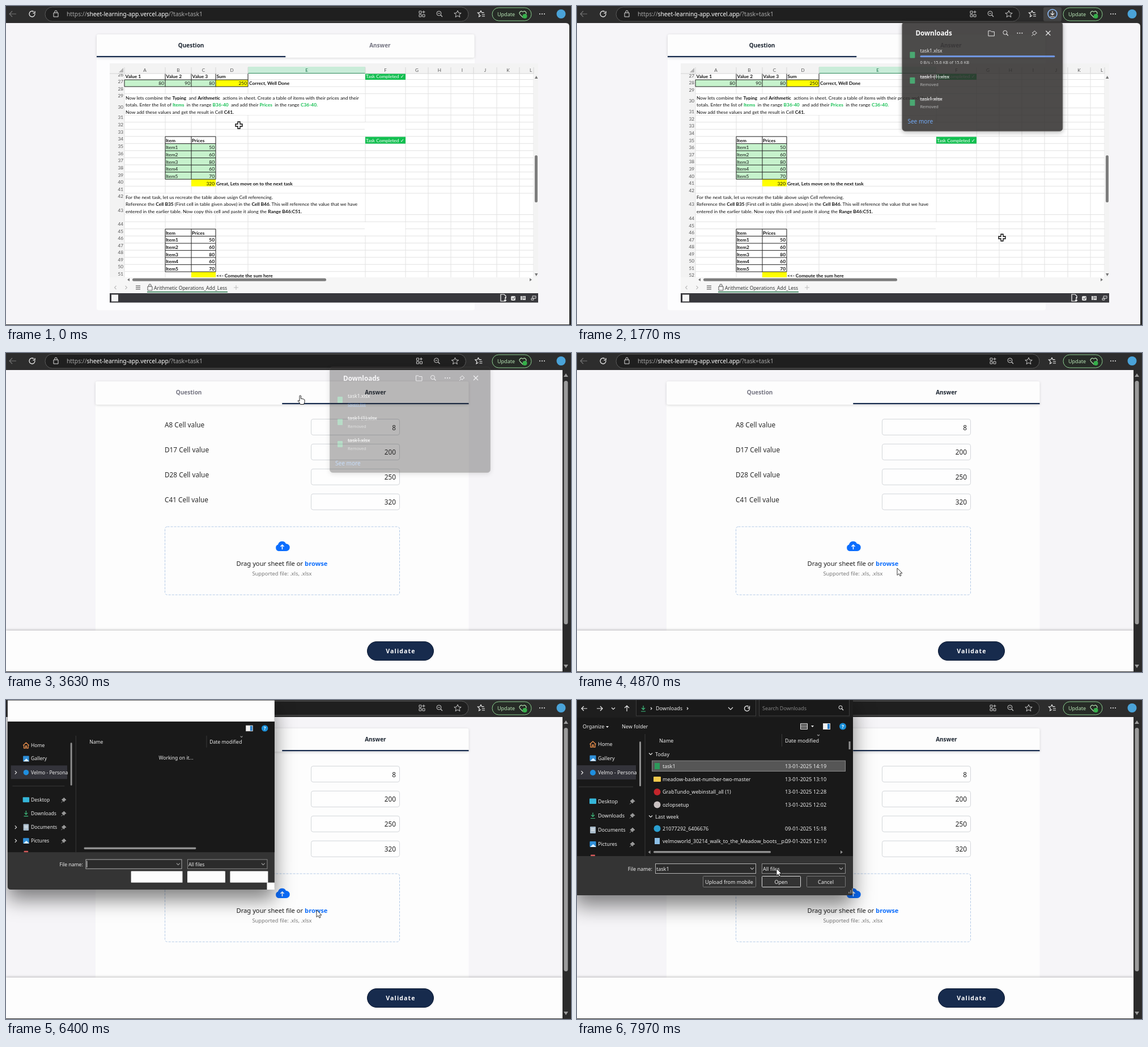
An HTML page that plays this animation: 997 px wide and 562 px high, repeating every 8 s.

```html
<!DOCTYPE html>
<html lang="en">
<head>
<meta charset="utf-8">
<title>Spreadsheet task walkthrough</title>
<style>
  html, body { margin: 0; width: 100%; height: 100%; overflow: hidden; background: #f6f5f8; }
  svg { display: block; width: 100vw; height: 100vh; font-family: "Noto Sans", "Open Sans", sans-serif; }
  .sheet { font-family: Lato, sans-serif; }
  #dialog { filter: drop-shadow(0 18px 18px rgba(0, 0, 0, .5)); }
  #popup { filter: drop-shadow(0 2px 4px rgba(0, 0, 0, .35)); }
</style>
</head>
<body>
<svg id="stage" viewBox="0 0 997 562"></svg>
<script>
const BOLD = 'font-weight="700"', SEMI = 'font-weight="600"';
const MID = 'text-anchor="middle"', END = 'text-anchor="end"';
const NAVY = '#172b4d', GREEN = '#12bf50', BLUE = '#0d6efd';

const rect = (x, y, w, h, fill, extra = '') =>
  `<rect x="${x}" y="${y}" width="${w}" height="${h}" fill="${fill}" ${extra}/>`;
const path = (d, stroke, width = 1, fill = 'none', extra = '') =>
  `<path d="${d}" stroke="${stroke}" stroke-width="${width}" fill="${fill}" ${extra}/>`;
const dot = (x, y, r, fill, extra = '') => `<circle cx="${x}" cy="${y}" r="${r}" fill="${fill}" ${extra}/>`;
// y is the vertical middle of the line
const text = (x, y, s, size, fill, extra = '') =>
  `<text x="${x}" y="${y + size * .36}" font-size="${size}" fill="${fill}" ${extra}>${s}</text>`;
const group = (id, content, extra = '') => `<g id="${id}" ${extra}>${content}</g>`;
const span = (s, extra) => `<tspan ${extra}>${s}</tspan>`;
const dots = (x, y, c) => [-4, 0, 4].map(d => dot(x + d, y, 1, c)).join('');
const lens = (x, y, c, r = 4) => dot(x - 1, y - 1, r, 'none', `stroke="${c}"`) + path(`M${x + r - 2} ${y + r - 2}l3 3`, c, 1.2);
const chevron = (x, y, c, d = 'down', s = 3) => path(
  d === 'down' ? `M${x - s} ${y - s / 2}l${s} ${s}l${s} ${-s}` :
  d === 'right' ? `M${x - s / 2} ${y - s}l${s} ${s}l${-s} ${s}` : `M${x + s / 2} ${y - s}l${-s} ${s}l${s} ${s}`, c, 1.1);
const downArrow = (x, y, c, s = 4) =>
  path(`M${x} ${y - s - 1}v${2 * s - 1}m${-s + 1} ${-s + 1}l${s - 1} ${s - 1}l${s - 1} ${-s + 1}M${x - s} ${y + s + 1}h${2 * s}`, c, 1.2);
const lock = (x, y, c) => path(`M${x - 4} ${y - 2}h8v7h-8zM${x - 2} ${y - 2}v-2a2 2 0 0 1 4 0v2`, c);
const pin = (x, y, c, fill = 'none') => path(`M${x} ${y - 4}l4 4l-2 .5l-2 3l-4 -4l3 -2zM${x - 2} ${y + 2}l-3 3`, c, 1, fill);
const reload = (x, y, c, r = 5) =>
  path(`M${x + r} ${y}a${r} ${r} 0 1 1 -${r * .4} -${r * .8}M${x + r} ${y - r}v3.5h-3.5`, c, 1.3);

function toolbar() {
  const c = '#c9c9c9';
  return rect(0, 0, 997, 30, '#2d2d2d') +
    path('M18 14H6M11 9l-5 5l5 5', '#777', 1.1) + reload(46, 14, '#eee') +
    rect(69, 2, 747, 25, '#1f1f1f', 'id="pill" rx="12.5" stroke="#5a5a5a"') + lock(88, 14, '#ddd') +
    text(107, 14, 'https://' + span('sheet-learning-app.vercel.app', 'fill="#fff"') + '/?task=task1', 10.3, '#aaa') +
    group('tools',
      path('M729 9h4v4h-4zM729 15h4v4h-4zM735 15h4v4h-4zM737 8v5M734.5 10.5h5', c) +
      lens(765, 14, c) + path('M762 13h4', c) +
      path('M797 8l1.8 4.2l4.4 .3l-3.4 2.8l1.1 4.3l-3.9 -2.4l-3.9 2.4l1.1 -4.3l-3.4 -2.8l4.4 -.3z', c) +
      path('M838 8l1.6 3.6h4M838 8l-1.6 3.6l-4 .4l3 2.8l-.9 4l3.6 -2M840 15h5M840 18h5', '#eee', 1.1)) +
    group('download', rect(823, 2, 32, 25, '#444', 'rx="3"') + downArrow(839, 14, '#eee') +
      dot(839, 14, 8, 'none', 'id="ring" stroke="#8fc0ff" stroke-width="1.5"')) +
    rect(858, 3, 69, 23, '#262b26', 'rx="11.5" stroke="#8ccf90"') + text(867, 14.5, 'Update', 9, '#b9e6b6') +
    path('M912 20l-5 -5a3.3 3.3 0 0 1 5 -4.5a3.3 3.3 0 0 1 5 4.5z', '#b9e6b6', 1.1) + dot(915.5, 18, 4, '#35b04a') +
    dots(946, 14, '#eee') + dot(979.5, 14, 8, '#4aa3d8');
}

function tabs(x, w, active) {
  const half = w / 2;
  return rect(x, 50, w, 41, '#fdfdfd', 'rx="3" style="filter:drop-shadow(0 1px 2px rgba(0,0,0,.15))"') +
    rect(x + active * half, 88, half, 2.3, NAVY) +
    ['Question', 'Answer'].map((s, i) =>
      text(x + half * (i + .5), 69.5, s, 10, i === active ? '#1b2430' : '#737380', `${SEMI} ${MID}`)).join('');
}

const ROW = 12.53, COLS = [209, 281, 327, 370, 427, 634, 705, 745, 785, 825, 866, 906, 931];
const cell = (x, y, s, extra = '', fill = '#111') => text(x, y, s, 8.4, fill, extra);

function priceTable(y, fill, weight) {
  const prices = [50, 60, 80, 60, 70];
  let out = rect(281, y + ROW, 89, ROW * 5, fill) + rect(327, y + ROW * 6, 43, ROW, '#ff0') +
    cell(282, y + 7, 'Item', BOLD) + cell(328, y + 7, 'Prices', BOLD);
  prices.forEach((p, i) => {
    const mid = y + ROW * (i + 1.55);
    out += cell(282, mid, 'Item' + (i + 1), weight) + cell(368, mid, p, `${END} ${weight}`);
  });
  const lines = [...Array(7).keys()].map(i => `M281 ${y + ROW * i}h89`).join('');
  return out + path(`${lines}M281 ${y}v${ROW * 6}M327 ${y}v${ROW * 6}M370 ${y}v${ROW * 6}`, '#222');
}

const done = y => rect(634, y, 71, 12, GREEN) + cell(635, y + 6.2, 'Task Completed ✓', '', '#fff');

function rowLabels(first, [top, wide, upper, tall, lower]) {
  let out = '';
  for (let r = first; r < first + 26; r++) {
    const y = r < 30 ? top + 12.5 * (r - first) : r === 30 ? wide : r < 43 ? upper + 12.64 * (r - 31)
      : r === 43 ? tall : lower + 12.56 * (r - 44);
    out += text(207, y, r, 8.2, '#555', END);
  }
  return out;
}

function grid() {
  let lines = '';
  for (let k = -1; k < 27; k++) if (![2, 16, 17].includes(k)) lines += `M209 ${142 + ROW * k}H931`;
  COLS.forEach(x => lines += `M${x} 119V478`);
  const green = s => span(s, `fill="${GREEN}" ${BOLD}`), bold = s => span(s, BOLD);
  return rect(183, 101, 756, 405, '#f3f3f3') + rect(209, 119, 722, 359, '#fff') + path(lines, '#e2e2e2') +
    rect(210, 155, 423.5, 37, '#fff') + rect(210, 330.5, 423.5, 37, '#fff') +
    rect(633, 205, 71.5, 24, '#fff') + rect(633, 381, 71.5, 23, '#fff') +
    rect(209, 130, 161, 12, '#c6f2cc') + rect(370, 130, 57, 12, '#ff0') +
    path('M209 130H427V142H209zM281 119V142M327 119V142M370 119V142M427 119V130', '#222') +
    ['Value 1', 'Value 2', 'Value 3', 'Sum'].map((s, i) => cell(COLS[i] + 1.5, 124, s, BOLD)).join('') +
    [80, 90, 80, 250].map((n, i) => cell(COLS[i + 1] - 2, 136, n, END)).join('') +
    cell(429, 136, 'Correct, Well Done', BOLD) + done(118) + done(230.5) +
    cell(211, 161.5, `Now lets combine the ${bold('Typing')} \u00a0and ${bold('Arithmetic')} \u00a0actions in sheet. Create a table of items with their prices and their`) +
    cell(211, 174, `totals. Enter the list of ${green('Items')} \u00a0in the range ${green('B36-40')} \u00a0and add their ${green('Prices')} \u00a0in the range ${green('C36-40.')}`) +
    cell(211, 186.5, `Now add these values and get the result in Cell ${bold('C41.')}`) +
    priceTable(230, '#c6f2cc', '') + cell(368, 312.5, 320, END) +
    cell(371, 312.5, 'Great, Lets move on to the next task', BOLD) +
    cell(211, 336.5, 'For the next task, let us recreate the table above usign Cell referencing.') +
    cell(211, 349, `Reference the ${bold('Cell B35')} (First cell in table given above) in the ${bold('Cell B46')}. This will reference the value that we have`) +
    cell(211, 361.5, `entered in the earlier table. Now copy this cell and paste it along the ${bold('Range B46:C51.')}`) +
    priceTable(393, '#fff', BOLD) + cell(371, 475, '&lt;&lt;- Compute the sum here', BOLD) +
    group('rowsBefore', rowLabels(26, [121, 178, 196.5, 360, 384])) +
    group('rowsAfter', rowLabels(27, [123, 167, 186, 349, 374]));
}

function workbook() {
  const g = '#777';
  return `<g class="sheet">${grid()}` + rect(183, 101, 756, 18, '#f3f3f3') +
    rect(427, 107, 207, 12, '#c9ecd9') + path('M427 118.5H634', '#2c8a5a') +
    path('M183 119H427M634 119H931' + COLS.map(x => `M${x} 108V119`).join(''), '#d5d5d5') +
    path('M207 109v8h-8z', 'none', 0, '#b5b5b5') +
    [...'ABCDEFGHIJK'].map((s, i) => text((COLS[i] + COLS[i + 1]) / 2, 113.5, s, 8.2, i === 4 ? '#17734a' : '#555', MID)).join('') +
    text(926, 113.5, 'L', 8.2, '#555', MID) + '</g>' +
    rect(931, 119, 8, 360, '#f3f3f3') + rect(933, 263, 5, 83, '#7d7d7d', 'rx="2.5"') +
    path('M933 128h5.500l-2.750 -5zM933 471h5.500l-2.750 5z', 'none', 0, g) +
    rect(183, 478, 756, 28, '#f6f6f6') + rect(223, 479.7, 342, 5, '#7d7d7d', 'rx="2.5"') +
    path('M218 479.500v5.500l-4 -2.750zM924 479.500v5.500l4 -2.750z', 'none', 0, g) +
    chevron(193, 496, '#bbb', 'left') + chevron(212, 496, '#bbb', 'right') +
    path('M229 493h8M229 496h8M229 499h8', '#444') + lock(254, 496, '#555') +
    text(261, 496.5, 'Arithmetic Operations_Add_Less', 8.5, '#333') + rect(249, 503, 142, 1.5, '#217346') +
    path('M402 496h8M406 492v8', '#bbb') +
    rect(183, 506, 756, 16.500, '#38383c') + rect(186, 508.5, 12, 12, '#f5f5f5') +
    path('M881 520h-8v-12h6l3 3v4M881 513v7m-2 -2l2 2l2 -2', '#fff', 1.2) +
    rect(891, 511, 8, 8, '#ddd', 'rx="2"') + path('M893 515l2 2l3 -4', '#38383c') +
    rect(908, 511, 9, 7, '#ddd') + path('M911 511v7M912 513h4M912 515h4', '#38383c', .8) +
    path('M929 511h6v4h-6zM927 515h4v3h-4z', '#ddd');
}

function questionPage() {
  return rect(0, 30, 997, 532, '#2b2b2b') + path('M0 30H988Q994 30 994 36V561H0z', 'none', 0, '#f6f5f8') +
    rect(160, 52, 667, 484, '#fdfdfe', 'rx="4"') + tabs(160, 666.5, 0) + workbook();
}

function answerPage() {
  const fields = [['A8', 8], ['D17', 200], ['D28', 250], ['C41', 320]];
  return rect(0, 30, 982, 532, '#f6f5f8') + rect(158, 60, 658.5, 430, '#fdfdfd') + tabs(158, 658.5, 1) +
    fields.map(([name, value], i) => {
      const y = 116.500 + 43.9 * i;
      return text(280, y + 10.5, name + ' Cell value', 11.8, '#2a2a2a') +
        rect(538.5, y, 156, 28, '#fefefe', 'rx="3.5" stroke="#d3d6da"') + text(688, y + 14.8, value, 11.8, '#222', END);
    }).join('') +
    rect(280.5, 306, 414, 120, 'none', 'rx="4" stroke="#b4cbe8" stroke-dasharray="4 2"') +
    path('M481 349a6 6 0 0 1 -1 -11.500a7.500 7.500 0 0 1 14 -1.500a6.500 6.500 0 0 1 .5 13z', 'none', 0, BLUE) +
    path('M487.500 346v-8m-3 3l3 -3l3 3', '#fff', 1.5) +
    text(487, 370.5, 'Drag your sheet file or ' + span('browse', `fill="${BLUE}" ${BOLD}`), 11.2, '#1c1c1c', MID) +
    text(487, 388.5, 'Supported file: .xls, .xlsx', 9.3, '#777', MID) +
    rect(0, 489, 982, 72, '#fdfdfd', 'style="filter:drop-shadow(0 -1px 2px rgba(0,0,0,.25))"') +
    rect(637.5, 508.5, 117, 33, NAVY, 'rx="16.5" stroke="#0c1a33"') +
    text(696.5, 525, 'Validate', 10.6, '#fff', `${BOLD} ${MID} letter-spacing="1.1"`) +
    rect(0, 561, 997, 1, '#2b2b2b') + rect(982, 30, 15, 532, '#2b2b2b') +
    rect(984.5, 49, 7, 429, '#9b9b9b', 'rx="3.5"') +
    path('M984 42h8l-4 -6zM984 549h8l-4 6z', 'none', 0, '#9b9b9b');
}

function downloads() {
  const c = '#e6e6e6', file = y => rect(585, y - 5, 9, 11, '#2c9a5b', 'rx="1"');
  const removed = (y, name) => file(y + 6) + text(603, y, name, 8.6, c, 'text-decoration="line-through"') +
    text(603, y + 14, 'Removed', 7.4, '#aaa');
  return rect(571.5, 27.5, 283, 186, '#2f2d2c', 'id="panel" rx="5" stroke="#4b4947"') +
    text(595, 47.5, 'Downloads', 11.7, '#fff', SEMI) +
    path('M723.500 43h4l1.500 1.500h5v7.500h-10.500z', c) + lens(754, 47, c, 3.5) + dots(779, 47, c) + pin(805, 47, c) +
    path('M825 43l8 8M833 43l-8 8', c, 1.2) + file(85) + text(603, 78.5, 'task1.xlsx', 8.6, c) +
    group('complete', text(603, 93, 'Open file', 7.5, '#5b9bf3', 'text-decoration="underline"')) +
    group('progress', rect(603, 86.5, 238, 3, '#5b8ae6', 'rx="1.5"') + text(603, 98.5, '0 B/s - 15.6 KB of 15.6 KB', 7.45, '#ccc')) +
    group('older', removed(118, 'task1 (1).xlsx') + removed(157, 'task1.xlsx') + text(581, 197, 'See more', 10.1, '#5b9bf3'));
}

function fileDialog() {
  const c = '#ececec', line = '#555';
  const item = (y, name, icon, pinned) => icon + text(37, y, name, 9, c) + (pinned ? pin(98, y, '#999', '#999') : '');
  const picture = y => rect(22.5, y - 5, 11, 10, '#2f8fd8', 'rx="1"') + path(`M23 ${y + 5}l5.500 -5l5.500 5z`, 'none', 0, '#dff0ff');
  const entry = (y, name, date, icon) => icon + text(151, y, name, 9, c) + text(367, y, date, 9.1, c);
  const button = (x, w, s, border) => rect(x + .5, 310.5, w, 19, '#333', `rx="1" stroke="${border}"`) +
    text(x + w / 2, 320.5, s, 9, c, MID);
  return path('M-6 -5H487V339Q487 344 482 344H0Q-6 344 -6 339z', 'none', 0, '#343434') +
    rect(-6, -5, 493, 280, '#191919') + rect(-6, -5, 493, 36, '#1e1e1e') +
    path('M120 60V275M3 153H99M361.500 60V82', '#3a3a3a') +
    path('M18 15H8m4 -4l-4 4l4 4M35 15H45m-4 -4l4 4l-4 4M88 20V10m-4 4l4 -4l4 4', c, 1.2) + chevron(64, 15, c) +
    rect(104.5, -2, 211, 30, '#191919', 'stroke="#3c3c3c"') + rect(321.5, -2, 159, 30, '#191919', 'stroke="#3c3c3c"') +
    downArrow(117, 15, '#3fbf7f') + chevron(131, 15, c, 'right', 2) + text(139, 15, 'Downloads', 9, c) +
    chevron(195, 15, c, 'right', 2) + chevron(271, 15, c, 'down', 4) + reload(300, 15, c, 4.5) +
    text(327, 15, 'Search Downloads', 9, '#858585') + lens(466, 14, c, 3) +
    group('commands', text(10, 47, 'Organize', 9, c) + path('M51 46h5l-2.500 3zM413 45h5l-2.500 3z', 'none', 0, c) +
      text(79, 47, 'New folder', 9, c) + path('M394.500 41.500h12v10h-12zM395 44h11M395 46.500h11M395 49h11', c)) +
    rect(434.5, 41.500, 12, 10, '#f2f2f2', 'stroke="#ddd"') + rect(442, 42, 4, 9, '#2a7fc9') +
    dot(469, 46.5, 6, '#1a8fd8') + text(469, 46.5, '?', 8.5, '#fff', `${BOLD} ${MID}`) +
    rect(0, 115, 104, 25, '#33333a') + chevron(9, 128, c, 'right') +
    item(77.5, 'Home', path('M22.500 78l5.500 -5l5.500 5M24 77v6h3v-4h2v4h3v-6', '#e08a4a', 1.4)) +
    item(102.5, 'Gallery', picture(102.5)) + item(128, 'Velmo - Persona', dot(28, 128, 5, '#1f8fe0')) +
    item(178.5, 'Desktop', rect(22, 173.5, 12, 9.500, '#35b6d9', 'rx="1"'), 1) +
    item(203.5, 'Downloads', downArrow(28, 203.5, '#3fbf7f'), 1) +
    item(229, 'Documents', rect(23, 223, 10, 12, '#a9bccb', 'rx="1"') + path('M25 227h6M25 230h6', '#fff'), 1) +
    item(254, 'Pictures', picture(254), 1) + rect(24, 272.5, 8, 2.5, '#d45a5a', 'rx="1"') +
    rect(110, 73, 3, 79, '#8f8f8f', 'rx="1.5"') +
    text(145, 71.5, 'Name', 9, c) + text(367, 71.5, 'Date modified', 9, c) + chevron(426, 62, '#999', 'down', 2) +
    rect(135, 266, 207, 3.5, '#8f8f8f', 'rx="1.5"') +
    group('files',
      rect(132.5, 107, 341, 18.500, '#565656', 'id="selection" stroke="#8a8a8a"') +
      chevron(130, 95, c) + text(138, 95.5, 'Today', 9, c) + chevron(130, 205, c) + text(138, 205.5, 'Last week', 9, c) +
      entry(117, 'task1', '13-01-2025 14:19', rect(137, 111, 9, 11, '#2c9a5b')) +
      entry(140, 'meadow-basket-number-two-master', '13-01-2025 13:10', rect(135, 135, 13, 9, '#f2c94c', 'rx="1"')) +
      entry(162, 'GrabTundo_webinstall_all (1)', '13-01-2025 12:28', dot(141.500, 162, 6, '#c4252b')) +
      entry(184.5, 'ozlopsetup', '13-01-2025 12:02', dot(141.500, 184.500, 6, '#c9c1c1')) +
      entry(227, '21077292_6406676', '09-01-2025 15:18', dot(141.500, 226.500, 6, '#2a9fd0')) +
      entry(249, 'velmoworld_30214_walk_to_the_Meadow_boots__p...', '09-01-2025 12:10', rect(137, 243, 9, 11, '#8cbfe6')) +
      rect(479.5, 73, 3, 14, '#8f8f8f') + path('M129.500 265v6l-4 -3zM465 265v6l4 -3z', 'none', 0, '#8f8f8f')) +
    text(133, 297.5, 'File name:', 9, c, END) +
    rect(138.5, 288.5, 177, 17, '#2b2b2b', 'stroke="#b5b5b5"') + rect(326.5, 288.5, 147, 17, '#2b2b2b', `stroke="#8d8d8d"`) +
    group('chosen', text(140, 297.5, 'task1', 9, c)) + text(328, 297.5, 'All files', 9, c) +
    chevron(309, 297, '#aaa') + chevron(466, 297, '#aaa') +
    button(222, 93, 'Upload from mobile', '#777') + button(326, 68, 'Open', '#ddd') + button(405, 68, 'Cancel', '#777') +
    path('M480 341v-3M483 341v-6M486 341v-9', '#bbb') +
    group('working', text(273, 101, 'Working on it...', 9, c) + path('M140.500 291v12', '#eee') +
      chevron(9, 229, c, 'right') + chevron(9, 254, c, 'right')) +
    group('blank', [[-6, -5, 493, 39], [222, 310, 95, 21], [326, 310, 70, 21], [405, 310, 70, 21], [473, 331, 14, 13]]
      .map(b => rect(...b, '#fdfdfd')).join(''));
}

const pointers = {
  cross: path('M-2 -6h4v4h4v4h-4v4h-4v-4h-4v-4h4z', '#000', 1.3, '#fff'),
  arrow: path('M0 0V12.500L3 9.800L5 14L7 13L5.200 9H9z', '#222', .9, '#fff'),
  hand: path('M-4 -6.500q1.500 -1.500 2.500 0v5q5 0 6.500 2v4q-1 2 -1.500 4h-6q-2 -4 -4.500 -6q0 -2 3 0z', '#222', 1, '#fff')
};

document.getElementById('stage').innerHTML =
  group('question', questionPage()) + group('answer', answerPage()) + toolbar() +
  group('popup', downloads()) + group('dialog', fileDialog()) +
  group('pointer', Object.entries(pointers).map(([id, d]) => group(id, d)).join(''));

const ui = Object.fromEntries([...document.querySelectorAll('[id]')].map(e => [e.id, e]));
const show = (id, on) => ui[id].style.display = on ? '' : 'none';
const move = (id, transform) => ui[id].setAttribute('transform', transform);
const ramp = (t, from, to) => Math.min(1, Math.max(0, (t - from) / (to - from)));
const easeOut = p => 1 - (1 - p) ** 2;
const smooth = p => p * p * (3 - 2 * p);

// time, x, y
const route = [[0, 411, 210], [1000, 877, 513], [1300, 877, 513], [1770, 750, 408], [2930, 509, 116],
  [3300, 522, 82], [3700, 522, 82], [4870, 565, 379], [5200, 547, 369], [6450, 548, 370],
  [7150, 190, 114], [7400, 190, 114], [7970, 352, 297], [8000, 353, 300]];

function pointerAt(t) {
  const i = Math.max(1, route.findIndex(k => k[0] > t));
  const [t0, x0, y0] = route[i - 1], [t1, x1, y1] = route[i], p = smooth(ramp(t, t0, t1));
  return [x0 + (x1 - x0) * p, y0 + (y1 - y0) * p];
}

function draw() {
  const t = performance.now() % 8000, answering = t >= 3500;
  show('question', !answering);
  show('answer', answering);
  show('rowsBefore', t < 300);
  show('rowsAfter', t >= 300);

  const shift = -35 * (easeOut(ramp(t, 1500, 1660)) - easeOut(ramp(t, 3500, 3705)));
  move('tools', `translate(${shift})`);
  ui.pill.setAttribute('width', 747 + shift);
  show('download', t >= 1600 && t < 3500);
  show('ring', t < 2050);

  const loading = t < 2050, opening = easeOut(ramp(t, 1660, 1860)), closing = ramp(t, 3500, 3695);
  show('popup', t >= 1660 && t < 3695);
  ui.popup.style.opacity = Math.min(1, ramp(t, 1660, 1790)) * (1 - closing);
  move('popup', `translate(${(1 - opening) * 12} ${(1 - opening) * 4 - closing * 4.5})`);
  show('progress', loading);
  show('complete', !loading);
  move('older', `translate(0 ${loading ? 6 : 0})`);
  ui.panel.setAttribute('height', loading ? 192 : 186);

  const grow = .9 + .1 * easeOut(ramp(t, 6315, 6575));
  show('dialog', t >= 6315);
  ui.dialog.style.opacity = ramp(t, 6315, 6390);
  move('dialog', `translate(193 122) scale(${grow}) translate(-193 -122)`);
  show('blank', t < 6620);
  show('commands', t >= 6620);
  show('working', t < 6750);
  show('files', t >= 6750);
  show('selection', t >= 7280);
  show('chosen', t >= 7280);

  const [x, y] = pointerAt(t);
  const kind = t < 3050 ? (y > 480 ? 'arrow' : 'cross') : t < 3800 || (t > 5050 && t < 6000) ? 'hand' : 'arrow';
  Object.keys(pointers).forEach(id => show(id, id === kind));
  move('pointer', `translate(${x} ${y})`);
  requestAnimationFrame(draw);
}
draw();
</script>
</body>
</html>
```
